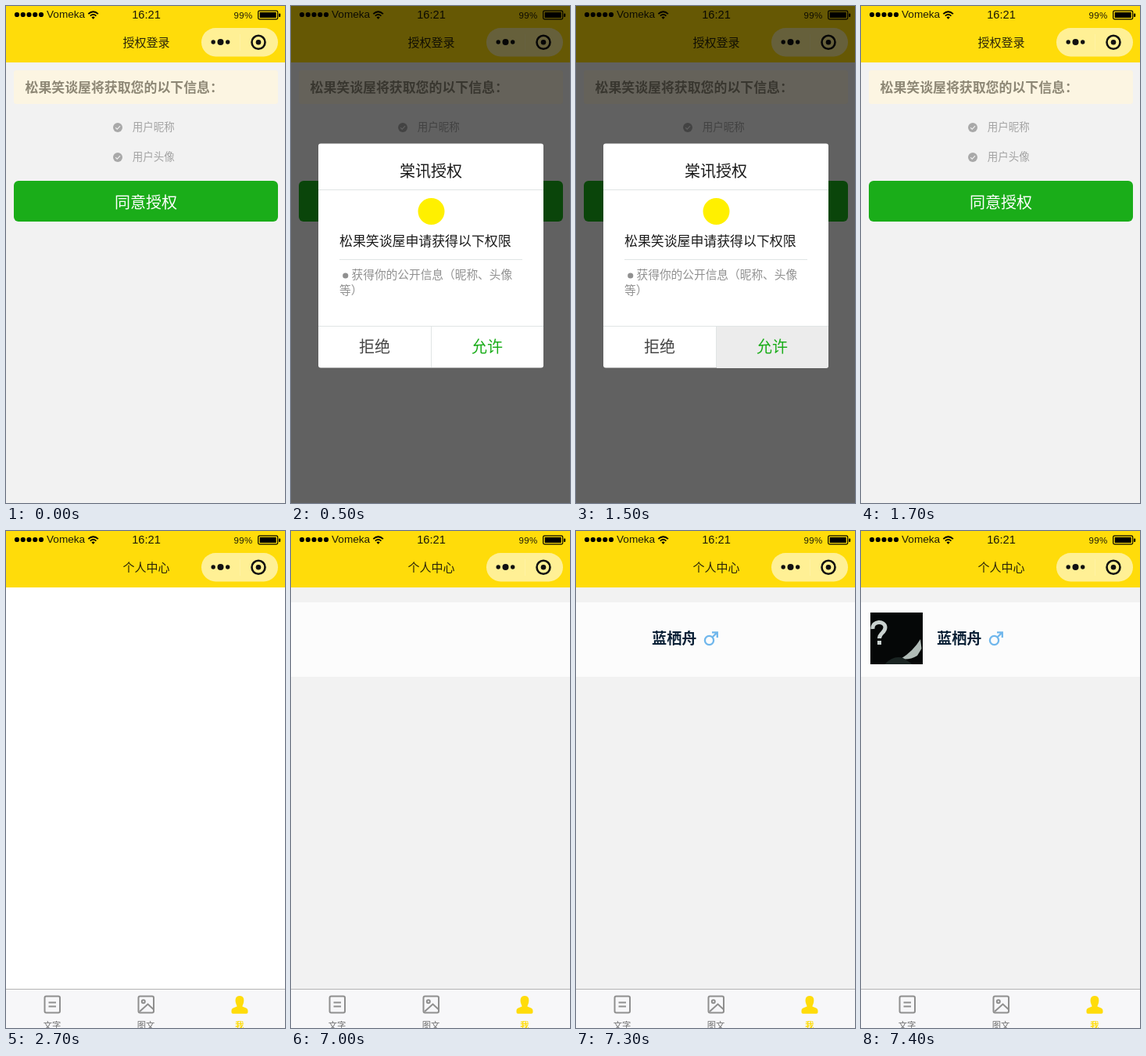
These frames come from a looping animation (357x634 px, 8000 ms). An HTML page:

```html
<!DOCTYPE html>
<html lang="zh-CN">
<head>
<meta charset="utf-8">
<title>授权登录</title>
<style>
html, body { margin: 0; width: 100%; height: 100%; overflow: hidden; background: #fff; }
svg { display: block; width: 357px; height: 634px; }
text { font: 300 15px "Noto Sans CJK SC", "Noto Sans CJK", "Noto Sans", sans-serif; white-space: pre; }
.latin { font-family: "Liberation Sans", Arial, sans-serif; font-weight: 400; }
.mid { text-anchor: middle; }
.s11 { font-size: 11.3px; }
.s13 { font-size: 13.5px; }
.s14 { font-size: 14.7px; }
.s17 { font-size: 16.9px; }
.s20 { font-size: 20px; }
.bold { font-weight: 700; }
.line { fill: none; stroke-width: 2; }

/* every part switches hard on the shared 8 s clock */
.step { opacity: 0; animation: 8s step-end infinite; }
.login { animation-name: login; }
.modal { animation-name: modal; }
.press { animation-name: press; }
.profile { animation-name: profile; }
.active { animation-name: active; }
.card { animation-name: card; }
.name { animation-name: name; }
.gender { animation-name: gender; }
.avatar { animation-name: avatar; }
@keyframes login { 0% { opacity: 1 } 28.75%, 100% { opacity: 0 } }
@keyframes modal { 0% { opacity: 0 } 6.25% { opacity: 1 } 21.25%, 100% { opacity: 0 } }
@keyframes press { 0% { opacity: 0 } 18.75% { opacity: 1 } 21.25%, 100% { opacity: 0 } }
@keyframes profile { 0% { opacity: 0 } 28.75%, 100% { opacity: 1 } }
@keyframes active { 0% { opacity: 0 } 33.75%, 100% { opacity: 1 } }
@keyframes card { 0% { opacity: 0 } 87.5%, 100% { opacity: 1 } }
@keyframes name { 0% { opacity: 0 } 88.75%, 100% { opacity: 1 } }
@keyframes gender { 0% { opacity: 0 } 91.25%, 100% { opacity: 1 } }
@keyframes avatar { 0% { opacity: 0 } 92.5%, 100% { opacity: 1 } }
</style>
</head>
<body>
<svg viewBox="0 0 357 634">
  <defs>
    <g id="check">
      <circle r="6" fill="#a9a9a9"/>
      <path d="M-2.8 .1L-.8 2.1L3-1.8" fill="none" stroke="#f2f2f2" stroke-width="1.2"/>
    </g>
    <clipPath id="photo"><rect x="12" y="104" width="67" height="66"/></clipPath>
  </defs>

  <rect width="357" height="634" fill="#fff"/>
  <rect width="357" height="72" fill="#ffdc0a"/>

  <!-- status bar -->
  <path d="M14 11H45.1" stroke="#000" stroke-width="6.2" stroke-linecap="round" stroke-dasharray="0 7.75"/>
  <g fill="#1c1a08">
    <text class="latin" x="52" y="15.3" style="font-size:13.6px">Vomeka</text>
    <text class="latin mid" x="179.5" y="16" style="font-size:14.6px">16:21</text>
    <text class="latin" x="291.5" y="16" style="font-size:11.5px;letter-spacing:.4px">99%</text>
  </g>
  <g fill="none" stroke="#000" stroke-width="1.8">
    <path d="M105.3 10.2Q111.6 4.2 117.9 10.2"/>
    <path d="M107.8 12.6Q111.6 9.2 115.4 12.6"/>
  </g>
  <path d="M109.5 14.4Q111.6 12.7 113.7 14.4L111.6 16.8Z"/>
  <rect x="322.7" y="6.2" width="25" height="10.6" rx="1.5" fill="none" stroke="#000" stroke-width="1.2"/>
  <rect x="324.7" y="8" width="21" height="7"/>
  <rect x="349" y="9.5" width="2.2" height="4.5" rx="1"/>

  <!-- menu capsule -->
  <rect x="250" y="28" width="98" height="36.4" rx="18.2" fill="#fff" fill-opacity=".57"/>
  <path d="M299.5 36V57" stroke="#fff" stroke-opacity=".15"/>
  <g fill="#111">
    <circle cx="265.2" cy="46" r="2.7"/>
    <circle cx="274.5" cy="46" r="4"/>
    <circle cx="283.7" cy="46" r="2.7"/>
    <circle cx="323" cy="46.3" r="3.3"/>
  </g>
  <circle cx="323" cy="46.3" r="8.5" fill="none" stroke="#111" stroke-width="2.6"/>

  <g class="step login">
    <text class="mid" x="179.5" y="52.3" fill="#29240a">授权登录</text>
    <rect y="72" width="357" height="562" fill="#f2f2f2"/>
    <rect x="10" y="82" width="338" height="43" rx="3" fill="#fcf5e2"/>
    <text class="s17 bold" x="24.5" y="110.3" fill="#8d8775">松果笑谈屋将获取您的以下信息：</text>
    <use href="#check" x="143" y="155"/>
    <text class="s13" x="161.7" y="159.2" fill="#a3a3a3">用户昵称</text>
    <use href="#check" x="143" y="193"/>
    <text class="s13" x="161.7" y="197.2" fill="#a3a3a3">用户头像</text>
    <rect x="10" y="223" width="338" height="52" rx="6" fill="#1aad19"/>
    <text class="s20 mid" x="179" y="257.5" fill="#fff" style="font-weight:500">同意授权</text>
  </g>

  <g class="step modal">
    <rect width="357" height="634" fill-opacity=".6"/>
    <rect x="35" y="175.4" width="288" height="286.2" rx="3" fill="#fff"/>
    <path class="step press" d="M180 408H323V459Q323 462 320 462H180Z" fill="#ececec"/>
    <text class="s20 mid" x="179" y="217.5" fill="#1a1a1a">棠讯授权</text>
    <path d="M35 234.5H323M62 323.5H296M35 408.5H323M179.5 408V461" stroke="#e0e5e5"/>
    <circle cx="179.5" cy="262" r="17" fill="#fff000"/>
    <text class="s17" x="62" y="306.2" fill="#1a1a1a">松果笑谈屋申请获得以下权限</text>
    <g fill="#909090">
      <circle cx="69.7" cy="344" r="3.6"/>
      <text class="s14" x="77.5" y="348.4">获得你的公开信息（昵称、头像</text>
      <text class="s14" x="62" y="367.5">等）</text>
    </g>
    <text class="s20 mid" x="107" y="441.5" fill="#444">拒绝</text>
    <text class="s20 mid" x="251" y="441.5" fill="#1aad19" style="font-weight:400">允许</text>
  </g>

  <g class="step profile">
    <text class="mid" x="179.5" y="52.3" fill="#29240a">个人中心</text>
    <g class="step card">
      <rect y="72" width="357" height="512" fill="#f2f2f2"/>
      <rect y="91" width="357" height="95" fill="#fcfcfc"/>
    </g>
    <g class="step avatar" clip-path="url(#photo)">
      <rect x="12" y="104" width="67" height="66" fill="#050707"/>
      <path d="M15 125C14 114 31 114 31 123C31 130 23.5 130 23.5 137M23.5 140V145" fill="none" stroke="#c9d1cf" stroke-width="5"/>
      <path d="M76 138L77.5 150L72 159Q62 165 51 163Q67 153 76 138Z" fill="#b0bbb6"/>
      <path d="M30 170Q42 158 54 162L66 170Z" fill="#1a2422"/>
    </g>
    <text class="step name bold" x="97" y="144.3" fill="#0a2036" style="font-size:19.2px">蓝栖舟</text>
    <g class="step gender line" stroke="#70b7ec" style="stroke-width:2.3">
      <circle cx="170.5" cy="139.5" r="5.6"/>
      <path d="M174.5 135.5L180.5 129.5M174 129.3H180.8V136"/>
    </g>

    <rect y="584" width="357" height="50" fill="#f7f7f9"/>
    <path d="M0 584.5H357" stroke="#b4b4b4"/>
    <g class="line" stroke="#8f8f8f">
      <rect x="49.5" y="593.5" width="19.5" height="21" rx="2"/>
      <path d="M54.5 601.5H64M54.5 606.5H64"/>
      <rect x="169.5" y="593.5" width="19.5" height="21" rx="2"/>
      <circle cx="175.8" cy="600.3" r="2"/>
      <path d="M171 613L181.5 603.5L188.5 610"/>
    </g>
    <path class="step active" d="M299 593C304.3 593 305 597.5 304 602C303.5 604 302.5 605 302.5 606.5C304 608 309.5 607.5 309.5 612V614Q309.5 615.7 307.5 615.7H290.5Q288.5 615.7 288.5 614V612C288.5 607.5 294 608 295.5 606.5C295.5 605 294.5 604 294 602C293 597.5 293.7 593 299 593Z" fill="#ffdc0a"/>
    <text class="s11 mid" x="59" y="634.8" fill="#6e6e6e">文字</text>
    <text class="s11 mid" x="179" y="634.8" fill="#6e6e6e">图文</text>
    <text class="s11 mid" x="299" y="634.8" fill="#ffdc0a" style="font-weight:700">我</text>
  </g>
</svg>
</body>
</html>
```
